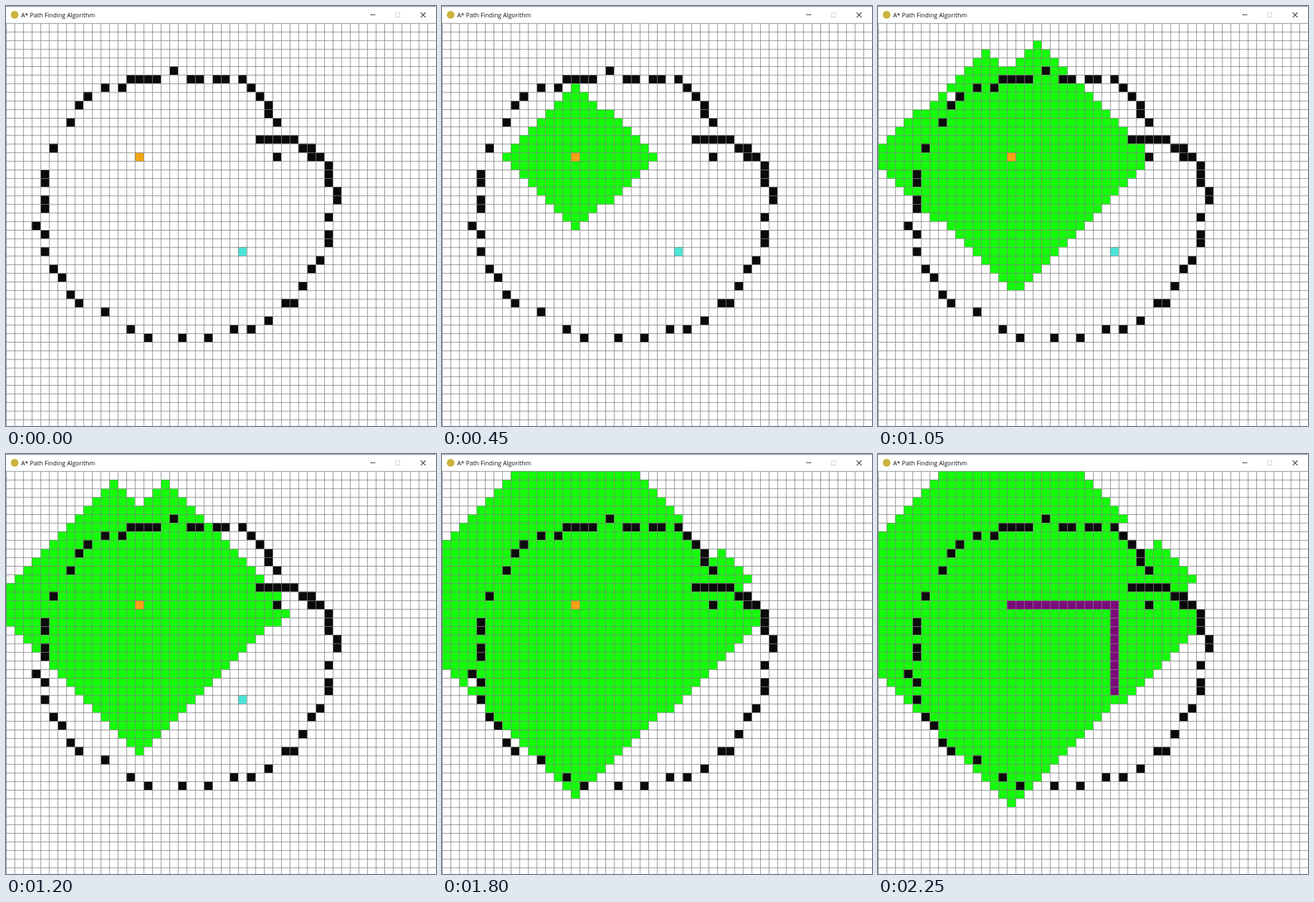
Write an HTML page with a canvas that moves like this. It is 758 by 739 pixels and loops after 2400 ms.

```html
<!DOCTYPE html>
<html lang="en">
<head>
<meta charset="utf-8">
<title>Path finding</title>
<style>
  html, body { margin: 0; width: 100%; height: 100%; overflow: hidden; background: #fff; }
  canvas, svg { position: absolute; left: 0; top: 0; display: block; }
  text { font: 10.75px "Open Sans", "Noto Sans", sans-serif; fill: #111; }
</style>
</head>
<body>
<canvas id="board" width="758" height="739"></canvas>
<svg width="758" height="30" viewBox="0 0 758 30" fill="none">
  <rect width="758" height="1.6" fill="#a6a6a6"/>
  <circle cx="15.3" cy="15.5" r="6.8" fill="#cdb43c"/>
  <text x="26.8" y="19.8">A* Path Finding Algorithm</text>
  <path d="M642 15.5h9" stroke="#222"/>
  <rect x="686.5" y="12" width="7.6" height="7.6" stroke="#cfcfcf"/>
  <path d="M731 11.5l8.6 8.6m0-8.6l-8.6 8.6" stroke="#222" stroke-width="1.1"/>
</svg>
<script>
const SIZE = 50, CELL = 15.16, TOP = 30.2;
const STEP = 150, STEPS = 16;
const GREEN = '#14ff0a', PURPLE = '#7a0a7a', BLACK = '#0a0a0a', TEAL = '#4ce5d6';

// Wall columns for rows 5 to 36; a dash marks a run.
const FIRST_ROW = 5;
const WALLS = '19|14-17 21-22 24-25 27|11 13 28|9 29|8 30|30|7 31||29-33|5 34-35|31 35-36|37|' +
  '4 37|4 37|38|4 38|4|37|3|4 37|37|4|36|5 35|6|34|7|8 32-33|11|30|14 26 28|16 20 23';

const id = (col, row) => row * SIZE + col;
const start = id(15, 15), end = id(27, 26);

const walls = new Set();
WALLS.split('|').forEach((line, i) => {
  for (const run of line.split(' ').filter(Boolean)) {
    const [a, b = a] = run.split('-').map(Number);
    for (let col = a; col <= b; col++) walls.add(id(col, FIRST_ROW + i));
  }
});

// Breadth-first search; foundAt holds the number of visits made when a cell was reached.
const foundAt = new Map([[start, 0]]), parent = new Map();
const queue = [start];
let visits = 0;
while (queue[visits] !== end) {
  const cell = queue[visits++];
  const col = cell % SIZE, row = (cell - col) / SIZE;
  for (const [dc, dr] of [[1, 0], [-1, 0], [0, 1], [0, -1]]) {
    const c = col + dc, r = row + dr, next = id(c, r);
    if (c < 0 || r < 0 || c >= SIZE || r >= SIZE) continue;
    if (walls.has(next) || foundAt.has(next)) continue;
    foundAt.set(next, visits);
    parent.set(next, cell);
    queue.push(next);
  }
}

const path = [];
for (let cell = parent.get(end); cell !== undefined; cell = parent.get(cell)) path.push(cell);

// Search progress: step, visits made.
const reach = (col, row) => foundAt.get(id(col, row));
const knots = [
  [1, 0], [3, reach(19, 10)], [5, reach(20, 7)], [8, reach(31, 17)],
  [10, reach(1, 22)], [12, reach(26, 27)], [13, reach(15, 38)], [14, visits]
];

function progress(step) {
  if (step <= knots[0][0]) return 0;
  for (let i = 1; i < knots.length; i++) {
    const [s0, v0] = knots[i - 1], [s1, v1] = knots[i];
    if (step <= s1) return v0 + (v1 - v0) * (step - s0) / (s1 - s0);
  }
  return visits;
}

const ctx = document.getElementById('board').getContext('2d');

function fill(cell, color) {
  const col = cell % SIZE, row = (cell - col) / SIZE;
  const x = Math.round(col * CELL), y = Math.round(TOP + row * CELL);
  ctx.fillStyle = color;
  ctx.fillRect(x, y, Math.round((col + 1) * CELL) - x, Math.round(TOP + (row + 1) * CELL) - y);
}

function draw(step) {
  ctx.fillStyle = '#fff';
  ctx.fillRect(0, 0, 758, 739);
  const done = progress(step);
  fill(end, TEAL);
  for (const [cell, at] of foundAt) if (at <= done) fill(cell, GREEN);
  fill(start, done ? '#fca014' : '#f2a70f');
  for (const cell of walls) fill(cell, BLACK);
  const shown = step < 14 ? 0 : step === 14 ? 7 : path.length;
  for (const cell of path.slice(0, shown)) fill(cell, PURPLE);

  ctx.fillStyle = '#808080';
  for (let i = 0; i < SIZE; i++) {
    ctx.fillRect(i * CELL, TOP, 1, 739);
    ctx.fillRect(0, TOP + i * CELL, 758, 1);
  }
}

const t0 = performance.now();
let last = -1;
function tick() {
  const step = Math.floor((performance.now() - t0) / STEP) % STEPS;
  if (step !== last) draw(last = step);
  requestAnimationFrame(tick);
}
tick();
</script>
</body>
</html>
```
